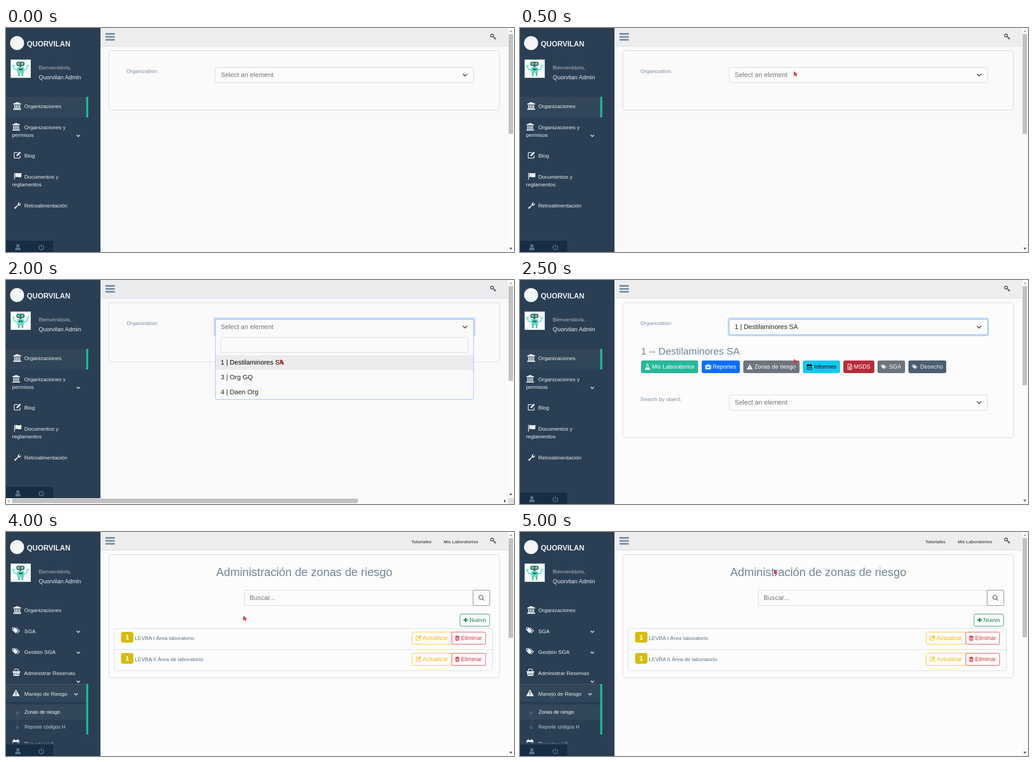
Animation of 1124x498 px, one loop 6000 ms. Source, as an HTML page:

```html
<!DOCTYPE html>
<html lang="es">
<head>
<meta charset="utf-8">
<title>Zonas de riesgo</title>
<style>
html, body { margin: 0; width: 100%; height: 100%; overflow: hidden; background: #fcfcfc; }
svg { display: block; width: 1124px; height: 498px; font-family: "Liberation Sans", Arial, sans-serif; }
text { white-space: pre; }
</style>
</head>
<body>
<svg id="stage" viewBox="0 0 1124 498"></svg>
<script>
const LOOP = 6000;
const SMALL = 11.84, BUTTON = 12.75, FIELD = 14.6;
const SLATE = '#73879c', LIGHT = '#ecf0f1', RED = '#dc3545', GREY = '#6c757d';

const steps = [
  { at: 0, page: 'home', thumb: 235.5 },
  { at: 500, page: 'home', thumb: 235.5, cursor: [606, 96] },
  { at: 1000, page: 'open', thumb: 223.5, cursor: [606, 96] },
  { at: 2000, page: 'open', thumb: 224, cursor: [606, 176] },
  { at: 2500, page: 'org', thumb: 234, cursor: [606, 175], hover: 'MSDS' },
  { at: 3500, page: 'org', thumb: 234, cursor: [525, 186], hover: 'Zonas de riesgo' },
  { at: 4000, page: 'risk', thumb: 235.5, cursor: [525, 186] },
  { at: 5000, page: 'risk', thumb: 234, cursor: [562, 83] }
];

// Icons live in a 16 by 16 box.
const icons = {
  bank: 'M8 0 16 3.5V5H0V3.5zM2 6h2v6H2zM5.3 6h2v6h-2zM8.6 6h2v6h-2zM11.9 6h2v6h-2zM1 12.4h14v1H1zM0 14h16v2H0z',
  flag: 'M0 1h1.5v15H0zM2.5 2C6-.5 9 4 16 1V10C10 13 7 8 2.5 11z',
  wrench: 'M15 2.5a4.6 4.6 0 0 1-6.3 5.6L3 15.3A2 2 0 0 1 .6 12.6L8 7A4.6 4.6 0 0 1 13.3 1L10.6 3.6l.4 2 2 .4z',
  edit: 'M3 2h7L8.6 3.5H3.4Q2 3.5 2 5v7.5Q2 14 3.4 14h8Q13 14 13 12.5V10l1.5-1.5v4.3Q14.5 15.5 12 15.5H3Q.5 15.5 .5 13V4.5Q.5 2 3 2zM6 8 13 1l2.5 2.5L8.5 10.5H6z',
  tags: 'M0 2h5.5L12 8.5 7 13.5.5 7zM2.5 3.2a1.2 1.2 0 1 0 .1 0zM7 2h1.5L15.5 8.5 10 14l-.8-.8L13.8 8.5z',
  warn: 'M8 1 16 15H0zM7 5.5h2l-.3 4.6H7.3zM7.1 11.3h1.8v1.8H7.1z',
  flask: 'M5 0h6v1.5h-1V6l5 8q.6 2-1 2H2q-1.6 0-1-2L6 6V1.5H5zM7.3 1.5v5L5 10h6L8.7 6.5v-5z',
  basket: 'M0 6h16v2.3h-1L13.7 16H2.3L1 8.3H0zM4 9.5V14h1.2V9.5zM7.4 9.5V14h1.2V9.5zM10.8 9.5V14H12V9.5zM2.5 5.5 4.5 1h7l2 4.5h-1.6L10.6 2.4H5.4L4.1 5.5z',
  calendar: 'M1 2h2.5V0h2v2h5V0h2v2H15V16H1zM2.3 6v8.7h11.4V6zM4 10l1-1 2 2 4-4 1 1-5 5z',
  doc: 'M2 0h8l4 4v12H2zM3.4 1.4v13.2h9.2V5H9V1.4zM5 7h6v1.2H5zM5 9.5h6v1.2H5zM5 12h6v1.2H5z',
  kit: 'M5 3V1h6v2h5v12H0V3zM6.3 3h3.4V2.2H6.3zM7 6v2H5v2h2v2h2v-2h2V8H9V6zM2.2 3v12h.9V3zM12.9 3v12h.9V3z',
  user: 'M8 0a4 4 0 0 1 4 4.2C12 7 10 9 8 9S4 7 4 4.2A4 4 0 0 1 8 0zM4.3 8.6Q8 11.4 11.7 8.6 15 9 15 13 15 16 12.5 16H3.5Q1 16 1 13 1 9 4.3 8.6z',
  trash: 'M1.5 3H5L6 1h4l1 2h3.5v1.5h-1L13 16H3L2.5 4.5h-1zM5 6v8h1.2V6zM7.4 6v8h1.2V6zM9.8 6v8H11V6z',
  plus: 'M6 1h4v5h5v4h-5v5H6v-5H1V6h5z'
};
const lineIcons = {
  power: 'M4.5 3.2A6.3 6.3 0 1 0 11.5 3.2M8 .5V8',
  search: 'M11 11 15 15M12 6.8A5.2 5.2 0 1 1 1.6 6.8 5.2 5.2 0 1 1 12 6.8',
  key: 'M8.6 5A3.6 3.6 0 1 1 1.4 5 3.6 3.6 0 1 1 8.6 5M7.8 7.3 15 13.5M11.2 10.5 9.6 12.4M13.6 12.6 12 14.5'
};

const text = (s, x, y, size, fill, more = '') =>
  `<text x="${x}" y="${y}" font-size="${size}" fill="${fill}" ${more}>${s}</text>`;
const box = (x, y, w, h, fill, stroke = 'none', r = 0, more = '') =>
  `<rect x="${x}" y="${y}" width="${w}" height="${h}" rx="${r}" fill="${fill}" stroke="${stroke}" ${more}/>`;
const line = (d, color, width = 1) =>
  `<path d="${d}" fill="none" stroke="${color}" stroke-width="${width}"/>`;
const shape = (d, fill) => `<path d="${d}" fill="${fill}" fill-rule="evenodd"/>`;
const icon = (name, x, y, size, color) =>
  `<g transform="translate(${x} ${y}) scale(${size / 16})">` +
  (icons[name] ? shape(icons[name], color) : line(lineIcons[name], color, 2.2)) + '</g>';
const chevron = (x, y, w, color, width) =>
  line(`M${x - w} ${y - w / 2}l${w} ${w}l${w} ${-w}`, color, width);

function robot() {
  const mint = '#5be3c6', dark = '#41696c';
  return box(10.5, 70.5, 44, 40, '#fbfdfc', '#c9d3d6') +
    line('M26 94 18 91 16 84M39 94 46 91 48 84', mint, 2.2) +
    line('M14 81v3h4v-3M46 81v3h4v-3', mint, 1.3) +
    box(23, 75, 18, 9.5, dark, 'none', 4) +
    '<circle cx="28" cy="79.5" r="2.6" fill="#6fd8a8"/><circle cx="36" cy="79.5" r="2.6" fill="#6fd8a8"/>' +
    box(30, 84, 4, 3, dark) + box(25, 87, 15, 13.5, mint, 'none', 2) +
    box(28, 90, 9, 4, dark) + line('M28.5 100v6M36.5 100v6', dark, 2) +
    box(26, 105, 5, 2.5, mint) + box(34, 105, 5, 2.5, mint);
}

const item = (s, y, x = 40.5) => text(s, x, y, SMALL, LIGHT);
const sideChevron = (x, y) => chevron(x, y, 3.6, '#c9d2da', 2);

function homeMenu() {
  return box(0, 153, 182, 46, 'url(#active)') + box(177.5, 153, 4.5, 46, '#1abb9c') +
    icon('bank', 16, 164.5, 17.5, LIGHT) + item('Organizaciones', 178) +
    icon('bank', 14, 211, 17, LIGHT) + item('Organizaciones y', 225) + item('permisos', 242, 13.5) +
    sideChevron(160, 239.5) +
    icon('edit', 17, 274, 16.5, LIGHT) + item('Blog', 288) +
    icon('flag', 18, 321, 16, LIGHT) + item('Documentos y', 334.5) + item('reglamentos', 352, 13.5) +
    icon('wrench', 18, 386.5, 16, LIGHT) + item('Retroalimentación', 399);
}

function riskMenu() {
  const dot = y => `<circle cx="24.8" cy="${y}" r="3.6" fill="#4a5d70"/>`;
  return icon('bank', 16, 164.5, 17.5, LIGHT) + item('Organizaciones', 178) +
    icon('tags', 13.5, 210, 18, LIGHT) + item('SGA', 225) + sideChevron(160, 221.5) +
    icon('tags', 13.5, 256.5, 18, LIGHT) + item('Gestión SGA', 271) + sideChevron(160, 268) +
    icon('basket', 14.5, 303, 17, LIGHT) + item('Administrar Reservas', 317.5, 40) + sideChevron(160, 332.5) +
    box(0, 338, 178, 41, 'url(#active)') + line('M0 338.5H178', '#4a5c6e') + line('M0 379.5H178', '#1d2e3f') +
    icon('warn', 13.5, 349, 17, LIGHT) + item('Manejo de Riesgo', 364) + sideChevron(155, 360.5) +
    box(0, 384, 178, 33, '#33475b') + box(177.5, 338, 4.5, 112, '#1abb9c') +
    line('M25 402V435', '#4a5d70') + dot(402) + dot(435) +
    text('Zonas de riesgo', 41, 403.5, 10.93, '#fff') +
    text('Reporte códigos H', 41, 436.5, 10.93, '#c8cfd5') +
    `<g clip-path="url(#fold)">${icon('calendar', 13.5, 460.5, 17, LIGHT)}${item('Reportes inf', 475)}</g>`;
}

function sidebar(page) {
  const bottom = page === 'open' ? 485 : 498;
  return box(0, 0, 209, 498, '#2a3f54') +
    '<circle cx="24.5" cy="33.5" r="15.5" fill="#f4f6f7"/>' +
    text('QUORVILAN', 46, 41, 16.1, LIGHT, 'font-weight="bold"') + robot() +
    text('Bienvenido/a,', 72.5, 92, SMALL, '#bab8b8') +
    text('Quorvilan Admin', 72.5, 113.5, BUTTON, LIGHT) +
    (page === 'risk' ? riskMenu() : homeMenu()) +
    box(0, bottom - 25, 104.5, 25, '#172d44') +
    icon('user', 19.5, bottom - 17.5, 13.5, '#5a738e') +
    icon('power', 71.5, bottom - 17.5, 13.5, '#5a738e');
}

function topBar(page) {
  const blue = page === 'open' || page === 'org';
  return box(209, 0, 902, 40, page === 'open' ? '#ebecee' : '#ededed') +
    box(209, 40, 902, 1, blue ? '#c5d9f1' : '#d9dcdf') +
    [11.3, 17.9, 24.5].map(y => box(220, y, 21, 3.6, '#708aa0', 'none', 1)).join('') +
    icon('key', 1071, 12.5, 14, '#515356') +
    (page === 'risk'
      ? text('Tutoriales', 897, 24.5, 9.47, '#515356', 'font-weight="bold"') +
        text('Mis Laboratorios', 968.5, 24.5, 9.47, '#515356', 'font-weight="bold"')
      : '');
}

const card = (bottom, fill) => box(227.5, 50.5, 864.5, bottom - 50.5, fill, '#cfd0d1', 4.5);

function select(y, value, color, focus) {
  return (focus ? box(459.5, y - 3.5, 578.5, 41.5, '#c3dafb', 'none', 6) : '') +
    box(463, y + .5, 571.5, 34, '#fcfcfc', focus ? '#86b7fe' : '#ced2d6', 3.6) +
    text(value, 475, y + 22, FIELD, color) + chevron(1015.8, y + 17.5, 4.6, '#343a40', 1.8);
}
const label = (s, y) => text(s, 266.5, y, SMALL, '#7b8da1');

function dropdown() {
  const option = (s, y, color = '#212529') => text(s, 475, y, FIELD, color);
  return box(459.5, 83.5, 578.5, 41.5, '#c3dafb') +
    box(463.5, 87.5, 571, 178, '#fafafa', '#86b7fe', 3) +
    text('Select an element', 475, 109, FIELD, GREY) + chevron(1015.8, 104.5, 4.6, '#343a40', 1.8) +
    box(475, 127.5, 547.5, 34, '#fafafa', '#cfd2d5', 3) + box(464, 167, 570, 33, '#ececec') +
    option('1 | Destilaminores SA', 188, '#000') +
    option('3 | Org GQ', 221) + option('4 | Daen Org', 253.5);
}

// label, icon, left, width, label left, fill, border, text colour, hover fill
const buttons = [
  ['Mis Laboratorios', 'flask', 268, 126, 292, '#26b99a', '#169f85', '#fff'],
  ['Reportes', 'kit', 402, 84.5, 426.5, '#0d6efd', '#0d6efd', '#fff'],
  ['Zonas de riesgo', 'warn', 494, 124.5, 518.5, GREY, GREY, '#fff', '#565e64'],
  ['Informes', 'calendar', 626, 82, 650.5, '#0dcaf0', '#0dcaf0', '#000'],
  ['MSDS', 'doc', 715.5, 68.5, 738.5, RED, RED, '#fff', '#b82c3a'],
  ['SGA', 'tags', 791, 61, 816.5, GREY, GREY, '#fff'],
  ['Desecho', 'tags', 859.5, 83.5, 885.5, '#4b5f71', '#364b5f', '#e4e8ec']
];

function button([name, mark, x, w, tx, fill, edge, color, over], hover) {
  const hot = name === hover;
  return box(x + .5, 179.5, w - 1, 27, hot ? over : fill, hot ? over : edge, 3) +
    icon(mark, x + 7.8, 186.5, 13, color) + text(name, tx, 197, BUTTON, color);
}

function orgPage(hover) {
  return card(350.5, '#fcfcfc') + label('Organization:', 100) +
    select(87, '1 | Destilaminores SA', '#212529', true) +
    text('1 -- Destilaminores SA', 267.5, 165.5, 21.87, SLATE) +
    buttons.map(b => button(b, hover)).join('') +
    label('Search by object:', 268.5) + select(255, 'Select an element', GREY);
}

function riskRow(name, y) {
  return box(254.5, y, 27.5, 24, '#d3bd0f', 'none', 5) +
    text('1', 268.2, y + 16.5, FIELD, '#fff', 'font-weight="bold" text-anchor="middle"') +
    text(name, 285, y + 17.5, SMALL, '#5a738e') +
    box(898.5, y + .5, 88, 27, 'none', '#ffc107', 3) +
    icon('edit', 906.5, y + 7, 12.5, '#f5b90a') + text('Actualizar', 922, y + 18.3, BUTTON, '#f5b90a') +
    box(986.5, y + .5, 74.5, 27, 'none', RED, 2) +
    icon('trash', 992.5, y + 7.5, 12, RED) + text('Eliminar', 1007, y + 18.3, BUTTON, RED);
}

function riskPage() {
  return card(324, '#fcfcfc') +
    text('Administración de zonas de riesgo', 465, 98.3, 25.5, SLATE) +
    box(527.5, 129.5, 506, 34, '#fcfcfc', '#ced2d6') + text('Buscar...', 539, 151, FIELD, GREY) +
    box(1033.5, 129.5, 37, 34, '#fcfcfc', GREY, 2) + icon('search', 1045, 139.5, 13.5, GREY) +
    box(1004.5, 182.5, 65.5, 27, '#fcfcfc', '#198754', 3) +
    icon('plus', 1011.5, 190, 11, '#198754') + text('Nuevo', 1025.5, 200, BUTTON, '#198754') +
    box(239.5, 214.5, 837, 94, 'none', '#d5d7d9', 4) + line('M240 261.5H1076', '#d5d7d9') +
    riskRow('LEVBA I Área laboratorio', 222) + riskRow('LEVBA II Área de laboratorio', 269);
}

function homePage(open) {
  return card(182.5, '#fafafa') + label('Organization:', 100) +
    (open ? dropdown() : select(87, 'Select an element', GREY));
}

function scrollbars(page, thumb) {
  const wide = page === 'open', down = wide ? 477 : 490.5;
  const grey = '#a8a8a8', dark = '#484848';
  return box(1111, 0, 13, 498, '#fbfbfb') + box(1112, 13.5, 10, thumb - 13.5, '#c1c1c1') +
    shape('M1113.5 9h7l-3.5-4z', grey) + shape(`M1113.5 ${down - 2}h7l-3.5 4z`, dark) +
    (wide
      ? box(0, 485, 1111, 13, '#fbfbfb') + box(13.5, 486, 765, 10, '#c1c1c1') +
        shape('M8 488v7l-4-3.5z', grey) + shape('M1102 488v7l4-3.5z', dark) +
        box(1111, 485, 13, 13, '#dcdcdc')
      : '');
}

const arrow = ([x, y]) =>
  `<path transform="translate(${x} ${y})" fill="${RED}" d="M0 0 8 7.6 5 8 7 11.6 5.2 12.4 3.3 8.8 0 11z"/>`;

const defs = `<defs>
  <linearGradient id="active" x2="0" y2="1"><stop stop-color="#344658"/><stop offset="1" stop-color="#2f455a"/></linearGradient>
  <clipPath id="fold"><rect y="450" width="209" height="19.5"/></clipPath>
</defs>`;

function draw({ page, thumb, cursor, hover }) {
  const content = page === 'risk' ? riskPage() : page === 'org' ? orgPage(hover) : homePage(page === 'open');
  const back = page === 'home' || page === 'open' ? '#f9f9f9' : '#fcfcfc';
  return defs + box(209, 0, 902, 498, back) + topBar(page) + content + sidebar(page) +
    scrollbars(page, thumb) + (cursor ? arrow(cursor) : '');
}

const stage = document.getElementById('stage');
const scenes = steps.map(draw);
let shown = -1;

function tick() {
  const t = performance.now() % LOOP;
  const now = steps.filter(s => s.at <= t).length - 1;
  if (now !== shown) stage.innerHTML = scenes[shown = now];
  requestAnimationFrame(tick);
}
tick();
</script>
</body>
</html>
```
